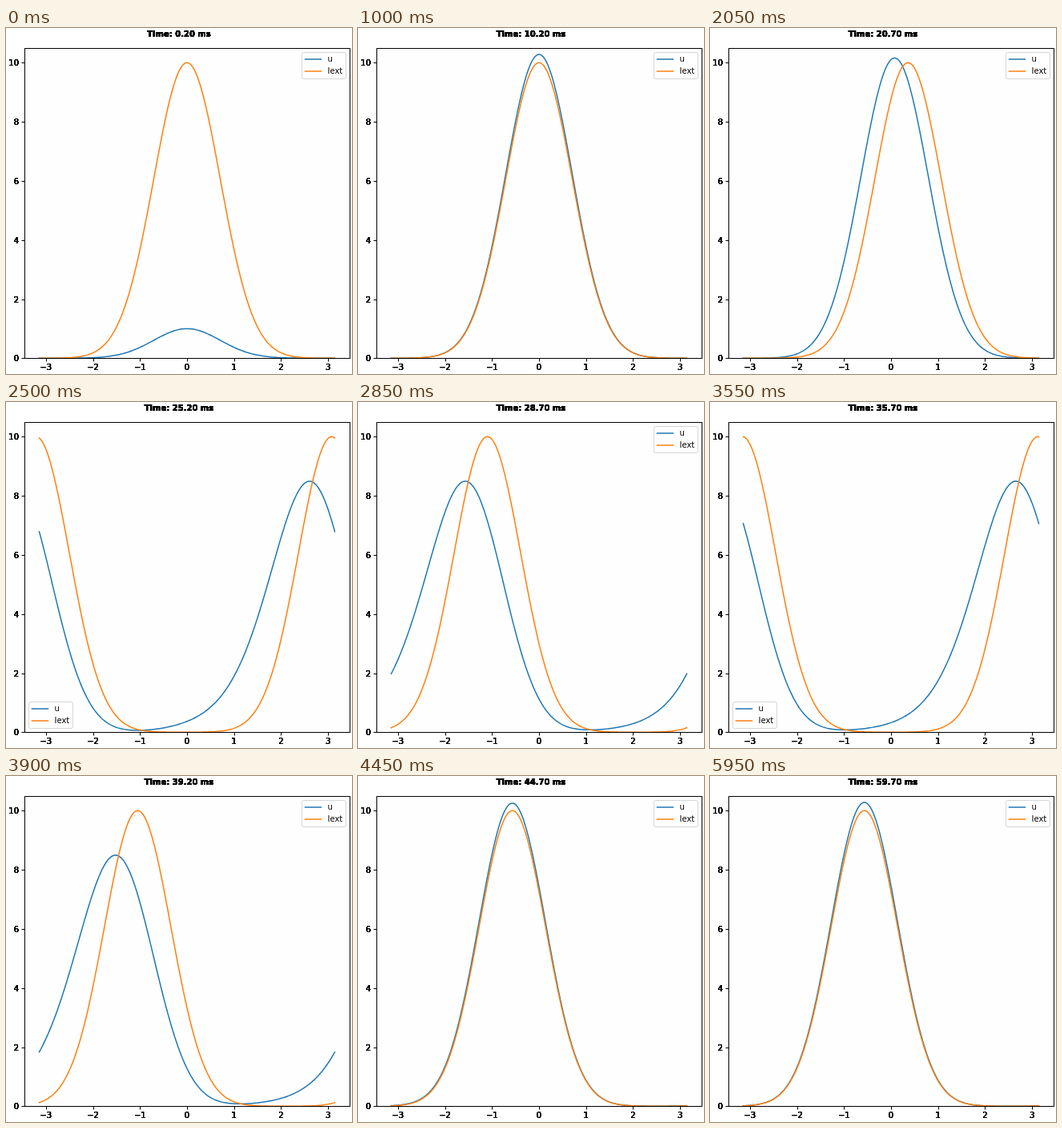
Recreate the animation shown at these times as an HTML page with a canvas. Size 432 by 432 pixels, loop 6000 ms.

```html
<!DOCTYPE html>
<html lang="en">
<head>
<meta charset="utf-8">
<title>Smooth tracking</title>
<style>
  html, body { margin: 0; width: 100%; height: 100%; overflow: hidden; background: #fff; }
  canvas { display: block; }
</style>
</head>
<body>
<canvas id="plot" width="432" height="432"></canvas>
<script>
const ctx = document.getElementById('plot').getContext('2d');
const FRAME_MS = 50, FRAMES = 120, STEPS_PER_FRAME = 5, DT = 0.1;
const BLUE = '#1f77b4', ORANGE = '#ff7f0e';
const FONT = '"DejaVu Sans", sans-serif';

// Data to pixels
const px = x => 226 + 58.73 * x;
const py = y => 412.3 - 36.9 * y;
const snap = v => Math.round(v) + 0.5;
const AXES = { left: 23.5, top: 25.5, right: 429.5, bottom: 412.5 };
const LEGEND = { w: 55, h: 33, pad: 5 };

// Ring attractor network that follows a moving bump of input
const N = 256, TAU = 2 * Math.PI, WIDTH = 0.5, J0 = 4, K = 8.1;
const xs = Array.from({ length: N }, (_, i) => -Math.PI + TAU * i / (N - 1));
const wrap = d => d - TAU * Math.round(d / TAU);
const kernel = Float64Array.from({ length: N }, (_, i) => {
  const d = wrap(TAU * i / (N - 1)) / WIDTH;
  return J0 * Math.exp(-0.5 * d * d) / (Math.sqrt(TAU) * WIDTH);
});

function stimulus(step) {
  const centre = 12 * Math.min(Math.max(step - 200, 0), 199) / 199;
  return xs.map(x => 10 * Math.exp(-(wrap(x - centre) ** 2)));
}

function advance(u, input) {
  const sq = u.map(v => v * v);
  const norm = 1 + K * sq.reduce((a, b) => a + b, 0);
  return u.map((v, i) => {
    let rec = 0;
    for (let j = 0; j < N; j++) rec += kernel[Math.abs(i - j)] * sq[j];
    return v + DT * (-v + rec / norm + input[i]);
  });
}

function simulate() {
  const frames = [];
  let u = new Array(N).fill(0);
  for (let step = 0; frames.length < FRAMES; step++) {
    const input = stimulus(step);
    if (step % STEPS_PER_FRAME === 1) {
      frames.push({ u, input, legend: placeLegend([u, input]), time: (step + 1) * DT });
    }
    u = advance(u, input);
  }
  return frames;
}

// First corner not crossed by a curve, otherwise the least crowded one
function placeLegend(curves) {
  const { w, h, pad } = LEGEND;
  const l = AXES.left + pad, r = AXES.right - pad - w;
  const t = AXES.top + pad - 0.5, b = AXES.bottom - pad - h;
  let best = null;
  for (const [x, y] of [[r, t], [l, t], [l, b], [r, b]]) {
    let hits = 0;
    for (const ys of curves) {
      ys.forEach((v, i) => {
        const cx = px(xs[i]), cy = py(v);
        if (cx > x && cx < x + w && cy > y && cy < y + h - 0.15) hits++;
      });
    }
    if (!best || hits < best.hits) best = { x, y: Math.floor(y) + 0.5, hits };
  }
  return best;
}

function line(x1, y1, x2, y2) {
  ctx.beginPath();
  ctx.moveTo(x1, y1);
  ctx.lineTo(x2, y2);
  ctx.stroke();
}

// Repeated passes give the hard-edged lettering outside the axes
function hardText(text, x, y, align, weight = '') {
  ctx.font = `${weight} 10px ${FONT}`;
  ctx.textAlign = align;
  ctx.fillStyle = '#000';
  for (let i = 0; i < 8; i++) ctx.fillText(text, x, y);
}

function drawCurve(ys, color) {
  ctx.strokeStyle = color;
  ctx.beginPath();
  ys.forEach((v, i) => ctx.lineTo(px(xs[i]), py(v)));
  ctx.stroke();
}

function drawAxes() {
  const { left, top, right, bottom } = AXES;
  ctx.strokeStyle = '#000';
  ctx.lineWidth = 1;
  ctx.lineCap = 'butt';
  ctx.strokeRect(left, top, right - left, bottom - top);
  for (let v = -3; v <= 3; v++) {
    const x = snap(px(v));
    line(x, bottom, x, bottom + 4);
    hardText(String(v).replace('-', '\u2212'), px(v), 427, 'center');
  }
  for (let v = 0; v <= 10; v += 2) {
    const y = snap(py(v));
    line(left - 4, y, left, y);
    hardText(String(v), 16, Math.round(py(v)) + 4, 'right');
  }
}

function drawLegend({ x, y }) {
  ctx.beginPath();
  ctx.roundRect(x, y, LEGEND.w, LEGEND.h, 2);
  ctx.fillStyle = 'rgba(255,255,255,0.8)';
  ctx.strokeStyle = 'rgba(204,204,204,0.8)';
  ctx.lineWidth = 1;
  ctx.fill();
  ctx.stroke();
  ctx.font = `10px ${FONT}`;
  ctx.textAlign = 'left';
  ctx.lineWidth = 1.5;
  ctx.lineCap = 'square';
  [['u', BLUE], ['Iext', ORANGE]].forEach(([label, color], row) => {
    const base = y + 11.5 + 15 * row;
    ctx.strokeStyle = color;
    line(x + 4, base - 3, x + 24, base - 3);
    ctx.fillStyle = '#000';
    ctx.fillText(label, x + 32, base);
  });
}

function draw({ u, input, legend, time }) {
  const { left, top, right, bottom } = AXES;
  ctx.fillStyle = '#fff';
  ctx.fillRect(0, 0, 432, 432);
  ctx.fillStyle = '#fefefe';
  ctx.fillRect(left, top, right - left, bottom - top);

  ctx.save();
  ctx.beginPath();
  ctx.rect(left, top, right - left, bottom - top);
  ctx.clip();
  ctx.lineWidth = 1.5;
  ctx.lineCap = 'square';
  ctx.lineJoin = 'round';
  drawCurve(u, BLUE);
  drawCurve(input, ORANGE);
  ctx.restore();

  drawAxes();
  drawLegend(legend);
  hardText(`Time: ${time.toFixed(2)} ms`, 216, 11, 'center', 'bold');
}

const frames = simulate();
const start = performance.now();
let shown = -1;

function tick() {
  const index = Math.floor((performance.now() - start) / FRAME_MS) % FRAMES;
  if (index !== shown) draw(frames[shown = index]);
  requestAnimationFrame(tick);
}
tick();
</script>
</body>
</html>
```
